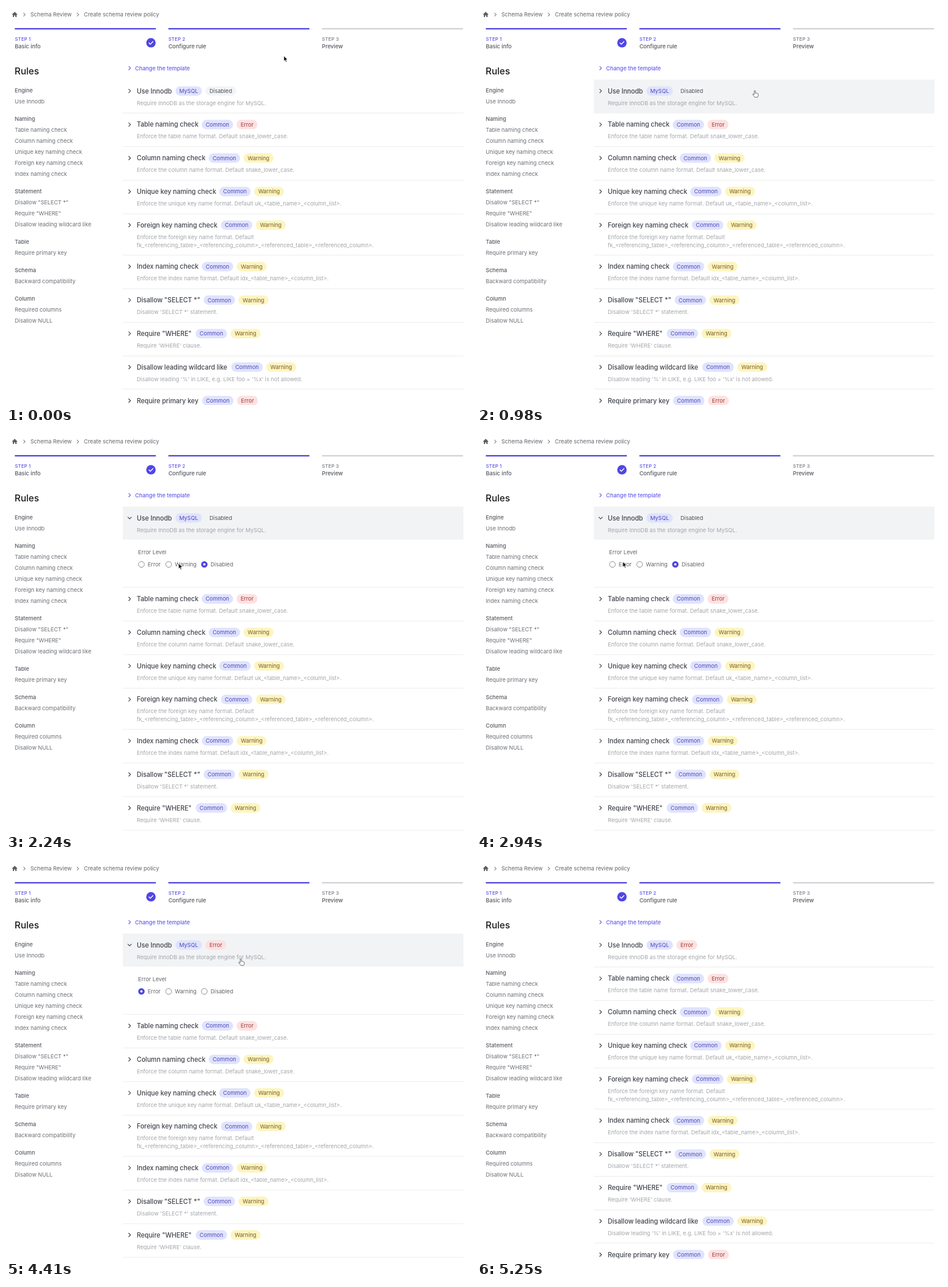
An HTML page that plays this animation: 800x688 px, repeating every 5320 ms.

```html
<!DOCTYPE html>
<html lang="en">
<head>
<meta charset="utf-8">
<title>Create schema review policy</title>
<style>
  html, body { margin: 0; width: 100%; height: 100%; overflow: hidden; background: #fff; }
  svg { display: block; }
  text { font-family: Inter, "Open Sans", sans-serif; white-space: pre; }
</style>
</head>
<body>
<svg id="stage" width="800" height="688" viewBox="0 0 800 688"></svg>
<script>
const LOOP = 5320, STEP = 70;
const INDIGO = '#4f46e5', DARK = '#3f434b', GRAY = '#62656d', PALE = '#a3a5aa';
const SMALL = 9.5, TITLE = 11.1;
const ROW_TOP = 126.9, ROW_H = 57.8, LINE_H = 13.7, PANEL_H = 81.6;
const LEFT = 201, RIGHT = 787;

const stage = document.getElementById('stage');

function add(parent, tag, attrs) {
  const el = document.createElementNS('http://www.w3.org/2000/svg', tag);
  for (const key in attrs) el.setAttribute(key, attrs[key]);
  parent.appendChild(el);
  return el;
}

// Places text by the vertical centre of its capitals.
function label(parent, str, x, cy, fill = GRAY, size = SMALL, weight = 400, more = {}) {
  const el = add(parent, 'text', {
    x, y: cy + size * 0.364, fill, 'font-size': size, 'font-weight': weight, ...more
  });
  el.textContent = str;
  return el;
}

function stroke(parent, d, color, width) {
  return add(parent, 'path', {
    d, fill: 'none', stroke: color, 'stroke-width': width,
    'stroke-linecap': 'round', 'stroke-linejoin': 'round'
  });
}

function chevron(parent, cx, cy, color = DARK, width = 1.25, r = 3) {
  return stroke(parent, `M${cx - r / 2} ${cy - r}l${r} ${r}l${-r} ${r}`, color, width);
}

const show = (el, on) => el.setAttribute('visibility', on ? 'visible' : 'hidden');

// Breadcrumb
add(stage, 'path', {
  d: 'M15 10L10.4 14.6L11.2 15.3L11.8 14.8V19H14V16.2H16V19H18.2V14.8L18.8 15.3L19.6 14.6Z',
  fill: '#5b5d64'
});
chevron(stage, 31.7, 14.8, '#7d8088', 1.1, 2.6);
label(stage, 'Schema Review', 42, 15);
chevron(stage, 123.7, 14.8, '#7d8088', 1.1, 2.6);
label(stage, 'Create schema review policy', 134, 15);

// Steps
['Basic info', 'Configure rule', 'Preview'].forEach((name, i) => {
  const x = 15.2 + i * 264.2, done = i < 2;
  add(stage, 'rect', { x, y: 38, width: 242.6, height: 2.5, fill: done ? '#564de0' : '#d3d4d7' });
  label(stage, `STEP ${i + 1}`, x, 57, done ? '#5a52e3' : '#757982', 8.16, 500, { 'letter-spacing': 0.2 });
  label(stage, name, x, 69.5, '#555860', SMALL, 500);
});
add(stage, 'circle', { cx: 249.4, cy: 63.4, r: 8.1, fill: INDIGO });
stroke(stage, 'M246.1 63.7l2.2 2.2l4.4-4.5', '#fff', 1.5);

// Sidebar
label(stage, 'Rules', 14.8, 111.7, '#1b1c1f', 16, 500);
const sections = [
  ['Engine', 'Use Innodb'],
  ['Naming', 'Table naming check', 'Column naming check', 'Unique key naming check',
    'Foreign key naming check', 'Index naming check'],
  ['Statement', 'Disallow "SELECT *"', 'Require "WHERE"', 'Disallow leading wildcard like'],
  ['Table', 'Require primary key'],
  ['Schema', 'Backward compatibility'],
  ['Column', 'Required columns', 'Disallow NULL']
];
let sideY = 145.5;
for (const section of sections) {
  section.forEach((str, i) => {
    if (i) sideY += 19.05;
    label(stage, str, 15, sideY, i ? '#6c6f77' : '#595c64', SMALL, i ? 400 : 500);
  });
  sideY += 29.9;
}

// Rules
chevron(stage, 212.7, 107.2, '#625ae8', 1.2, 2.8);
label(stage, 'Change the template', 222, 107.5, '#655dec', SMALL, 500);

const badges = {
  MySQL: [45.5, '#e0e3fd', '#4f48b8'],
  Common: [54, '#e0e3fd', '#4f48b8'],
  Error: [36, '#fde1e1', '#a03838'],
  Warning: [51.5, '#fcf5c0', '#7c5a24'],
  Disabled: [53, '#f3f4f5', '#4c4f57']
};

function badge(parent, name, x, cy) {
  const [width, bg, fg] = badges[name];
  const g = add(parent, 'g', {});
  add(g, 'rect', { x, y: cy - 8.15, width, height: 16.3, rx: 8.15, fill: bg });
  label(g, name, x + width / 2, cy, fg, SMALL, 400, { 'text-anchor': 'middle' });
  return g;
}

// title, badge x, engine, level, description lines
const rules = [
  ['Use Innodb', 291.5, 'MySQL', 'Disabled', 'Require InnoDB as the storage engine for MySQL.'],
  ['Table naming check', 336.7, 'Common', 'Error',
    'Enforce the table name format. Default snake_lower_case.'],
  ['Column naming check', 348.7, 'Common', 'Warning',
    'Enforce the column name format. Default snake_lower_case.'],
  ['Unique key naming check', 366.8, 'Common', 'Warning',
    'Enforce the unique key name format. Default uk_<table_name>_<column_list>.'],
  ['Foreign key naming check', 369.8, 'Common', 'Warning',
    'Enforce the foreign key name format. Default',
    'fk_<referencing_table>_<referencing_column>_<referenced_table>_<referenced_column>.'],
  ['Index naming check', 336.9, 'Common', 'Warning',
    'Enforce the index name format. Default idx_<table_name>_<column_list>.'],
  ['Disallow "SELECT *"', 340, 'Common', 'Warning', "Disallow 'SELECT *' statement."],
  ['Require "WHERE"', 326.3, 'Common', 'Warning', "Require 'WHERE' clause."],
  ['Disallow leading wildcard like', 387.7, 'Common', 'Warning',
    "Disallow leading '%' in LIKE, e.g. LIKE foo = '%x' is not allowed."],
  ['Require primary key', 337.4, 'Common', 'Error']
];

const lower = add(stage, 'g', {});
let rowY = ROW_TOP;
const rows = rules.map(([title, x, engine, level, ...lines], i) => {
  const top = rowY, cy = top + 19.7;
  const height = ROW_H + Math.max(0, lines.length - 1) * LINE_H;
  const g = add(i ? lower : stage, 'g', {});
  const bg = add(g, 'rect', { x: LEFT, y: top, width: RIGHT - LEFT, height, fill: '#f2f3f4' });
  if (i) {
    add(g, 'rect', {
      x: LEFT, y: Math.floor(top), width: RIGHT - LEFT, height: 1, fill: '#ebecee'
    });
  }
  const arrow = chevron(g, 212.7, cy);
  label(g, title, 225, cy, DARK, TITLE, 500);
  badge(g, engine, x, cy);
  const levelX = x + badges[engine][0] + 6;
  const levelBadge = badge(g, level, levelX, cy);
  lines.forEach((line, n) => label(g, line, 225, top + 40.3 + n * LINE_H, PALE));
  rowY += height;
  return { top, height, bg, arrow, cy, g, levelX, levelBadge };
});
const first = rows[0];
const errorBadge = badge(first.g, 'Error', first.levelX, first.cy);

// Options panel
const panel = add(stage, 'g', {});
label(panel, 'Error Level', 227.3, 205.3);
const radios = [['Error', 233], ['Warning', 279.8], ['Disabled', 341.2]].map(([name, cx]) => {
  const cy = 226.6;
  add(panel, 'circle', { cx, cy, r: 5, fill: '#fff', stroke: '#777b84', 'stroke-width': 0.9 });
  const dot = add(panel, 'circle', {
    cx, cy, r: 3.7, fill: '#fff', stroke: INDIGO, 'stroke-width': 3.4
  });
  label(panel, name, cx + 10.8, 227);
  return dot;
});
const ring = add(panel, 'circle', {
  cx: 233, cy: 226.6, r: 7.6, fill: 'none', stroke: INDIGO, 'stroke-width': 1.4
});

// Pointers, both with the hot spot at 0,0
const arrowCursor = add(stage, 'path', {
  d: 'M0 0V9.2L2.1 7.3L3.6 10.7L5.2 10L3.7 6.7L6.5 6.5Z',
  fill: '#111', stroke: '#fff', 'stroke-width': 0.7
});
const handCursor = add(stage, 'path', {
  d: 'M-1 1.1a1 1 0 0 1 2 0V4.6q1-.6 1.9 .2q1-.5 1.7 .5q1.3-.2 1.3 1.1V8.2' +
     'q0 2-1.1 3.4H0Q-1.2 9.9-2.7 8.2Q-4.1 6.6-3.4 6Q-2.5 5.5-1 7.2Z',
  fill: '#fff', stroke: '#54575d', 'stroke-width': 0.9, 'stroke-linejoin': 'round'
});

// Pointer path: time, x, y
const path = [
  [0, 478, 86], [210, 478, 86], [840, 478, 145.4], [1400, 478, 147.2], [1610, 478, 147.2],
  [2240, 297, 225], [2800, 251, 222], [3850, 251, 222], [4410, 404, 170.2],
  [4620, 404, 170.2], [5180, 815, 405], [LOOP, 815, 405]
];
const OPEN = 1370, PICK = 3080, BLUR = 4340, CLOSE = 4480, TURN = 150;

const clamp = v => Math.min(1, Math.max(0, v));
const ease = v => v * v * (3 - 2 * v);

function pointer(t) {
  const i = path.findIndex(p => p[0] > t);
  const [t0, x0, y0] = path[i - 1], [t1, x1, y1] = path[i];
  const k = ease((t - t0) / (t1 - t0));
  return [x0 + (x1 - x0) * k, y0 + (y1 - y0) * k];
}

function draw(t) {
  const [x, y] = pointer(t);
  const open = t >= OPEN && t < CLOSE;
  const picked = t >= PICK;
  const shift = open ? PANEL_H : 0;

  lower.setAttribute('transform', `translate(0 ${shift})`);
  let overRow = false;
  rows.forEach((row, i) => {
    const top = row.top + (i ? shift : 0);
    const over = x >= LEFT && x < RIGHT && y >= top && y < top + row.height;
    overRow = overRow || over;
    show(row.bg, over || (!i && open));
  });
  first.bg.setAttribute('height', open ? 56.8 : 58.4);

  const turn = 90 * (ease(clamp((t - OPEN - 30) / TURN)) - ease(clamp((t - CLOSE) / TURN)));
  first.arrow.setAttribute('transform', `rotate(${turn} 212.7 ${first.cy})`);
  show(first.levelBadge, !picked);
  show(errorBadge, picked);

  panel.setAttribute('display', open ? 'inline' : 'none');
  show(radios[0], picked);
  show(radios[1], false);
  show(radios[2], !picked);
  show(ring, picked && t < BLUR);

  show(handCursor, overRow);
  show(arrowCursor, !overRow);
  for (const el of [handCursor, arrowCursor]) el.setAttribute('transform', `translate(${x} ${y})`);
}

const start = performance.now();
function tick() {
  const t = (performance.now() - start) % LOOP;
  draw(Math.floor(t / STEP) * STEP);
  requestAnimationFrame(tick);
}
tick();
</script>
</body>
</html>
```
